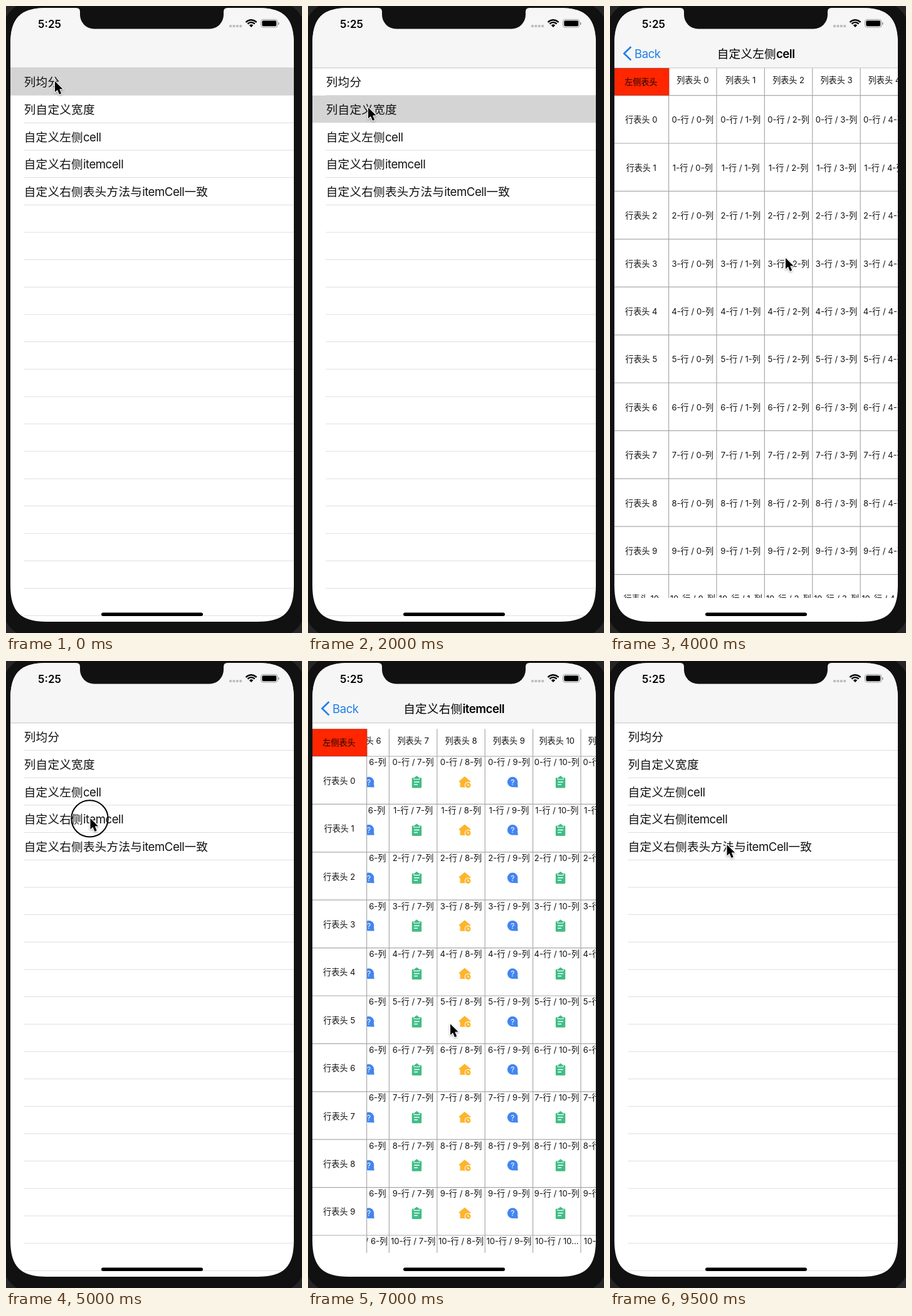
Animation of 472x1000 px, one loop 10000 ms. Source, as an HTML page with a canvas:

```html
<!DOCTYPE html>
<html lang="zh">
<head>
<meta charset="utf-8">
<title>Table demo</title>
<style>
html, body { margin: 0; width: 100%; height: 100%; overflow: hidden; background: #111; }
canvas { display: block; width: 472px; height: 1000px; }
</style>
</head>
<body>
<canvas id="stage"></canvas>
<script>
const canvas = document.getElementById('stage');
const ctx = canvas.getContext('2d');
const ratio = window.devicePixelRatio || 1;
canvas.width = 472 * ratio;
canvas.height = 1000 * ratio;

const FONT = 'Inter, "Noto Sans CJK SC", "Noto Sans CJK", sans-serif';
const LEFT = 7, RIGHT = 459, TOP = 99, BOTTOM = 944;
const SCREEN_TOP = 3, SCREEN_BOTTOM = 982;
const SIDE = 93.6, HEAD = 43.6, CELL = 76.4;
const INK = '#111', GRID = '#a9a9a9', WHITE = '#fff';
const STEP = 500;

const TITLES = ['列均分', '列自定义宽度', '自定义左侧cell', '自定义右侧itemcell', '自定义右侧表头方法与itemCell一致'];

const list = (cursor, opts) => ({ cursor, ...opts });
const table = (page, x, y, cursor, press) => ({ page, x, y, cursor, press });

const STATES = [
  list([78, 120], { lit: 0 }),
  table(0, 0, 0, [300, 332], true),
  table(0, 1050.6, 0, [100.5, 135]),
  list([64, 114]),
  list([96, 162], { lit: 1 }),
  table(1, 0, 0, [330, 412]),
  table(1, 0, 84, [373.3, 343], true),
  list([92, 207], { lit: 2 }),
  table(2, 0, 0, [280, 402]),
  table(2, 0, 0, [60, 82]),
  list([134.5, 251], { press: true }),
  table(3, 0, 0, [260, 422]),
  table(3, 0, 120, [280, 402], true),
  table(3, 250, 0, [250, 482], true),
  table(3, 499, -9.4, [227, 579]),
  table(3, 499, 0, [120, 242]),
  list([64, 92]),
  list([185.5, 293], { lit: 4 }),
  table(4, 0, 0, [185.5, 293]),
  list([186.5, 293])
];

function box(x, y, w, h, color, r = 0) {
  ctx.fillStyle = color;
  ctx.beginPath();
  ctx.roundRect(x, y, w, h, r);
  ctx.fill();
}

function disc(x, y, r, color) {
  ctx.fillStyle = color;
  ctx.beginPath();
  ctx.arc(x, y, r, 0, Math.PI * 2);
  ctx.fill();
}

function path(points, color, width) {
  ctx.beginPath();
  points.forEach(p => ctx.lineTo(p[0], p[1]));
  ctx.strokeStyle = color;
  ctx.lineWidth = width;
  ctx.stroke();
}

function polygon(points, color) {
  ctx.beginPath();
  points.forEach(p => ctx.lineTo(p[0], p[1]));
  ctx.closePath();
  ctx.fillStyle = color;
  ctx.fill();
}

function clipped(x, y, w, h, draw) {
  ctx.save();
  ctx.beginPath();
  ctx.rect(x, y, w, h);
  ctx.clip();
  draw();
  ctx.restore();
}

// Screen outline with smooth corners: each starts `a` from the corner, with handles at `c`.
function screenPath() {
  const a = 58, c = 16;
  const [l, t, r, b] = [LEFT, SCREEN_TOP, RIGHT, SCREEN_BOTTOM];
  ctx.beginPath();
  ctx.moveTo(l + a, t);
  ctx.lineTo(r - a, t);
  ctx.bezierCurveTo(r - c, t, r, t + c, r, t + a);
  ctx.lineTo(r, b - a);
  ctx.bezierCurveTo(r, b - c, r - c, b, r - a, b);
  ctx.lineTo(l + a, b);
  ctx.bezierCurveTo(l + c, b, l, b - c, l, b - a);
  ctx.lineTo(l, t + a);
  ctx.bezierCurveTo(l, t + c, l + c, t, l + a, t);
}

// Latin and CJK runs get their own weight and tracking; y is the vertical middle.
function text(str, x, y, size, { color = INK, bold = false, align = 'center' } = {}) {
  ctx.fillStyle = color;
  ctx.textBaseline = 'alphabetic';
  ctx.textAlign = 'left';
  const large = size > 18;
  const setStyle = run => {
    const cjk = run.charCodeAt(0) > 0x2fff;
    const weight = bold ? (cjk ? 500 : 600) : 400;
    ctx.font = `${weight} ${size}px ${FONT}`;
    ctx.letterSpacing = (large ? (cjk ? 0.25 : size * -0.025) : 0) + 'px';
  };
  const runs = (str.match(/[\u3000-\u9fff]+|[^\u3000-\u9fff]+/g) || []).map(run => {
    setStyle(run);
    return { run, width: ctx.measureText(run).width };
  });
  if (align === 'center') x -= runs.reduce((sum, r) => sum + r.width, 0) / 2;
  for (const { run, width } of runs) {
    setStyle(run);
    ctx.fillText(run, x, y + size * 0.37);
    x += width;
  }
  ctx.letterSpacing = '0px';
}

function statusBar() {
  text('5:25', 69.5, 28.3, 17, { bold: true, color: '#000' });
  for (let i = 0; i < 4; i++) box(356 + i * 5.4, 30, 4, 4, '#bdbdbd', 1.5);

  ctx.strokeStyle = '#000';
  ctx.lineWidth = 2.4;
  for (const r of [11.3, 7.4]) {
    ctx.beginPath();
    ctx.arc(391, 33.5, r, -Math.PI * 0.77, -Math.PI * 0.23);
    ctx.stroke();
  }
  ctx.fillStyle = '#000';
  ctx.beginPath();
  ctx.moveTo(391, 34);
  ctx.arc(391, 33.5, 4.2, -Math.PI * 0.77, -Math.PI * 0.23);
  ctx.fill();

  ctx.strokeStyle = '#999';
  ctx.lineWidth = 1;
  ctx.beginPath();
  ctx.roundRect(406.5, 21.5, 26.5, 12.5, 3.5);
  ctx.stroke();
  box(408.3, 23.3, 22.9, 8.9, '#000', 2);
  box(434, 26, 1.6, 4, '#999', 1);
}

function notch() {
  ctx.fillStyle = '#111';
  ctx.beginPath();
  ctx.moveTo(112, 2);
  ctx.lineTo(112, 3);
  ctx.quadraticCurveTo(118, 3, 118, 9);
  ctx.lineTo(118, 14);
  ctx.arcTo(118, 36.5, 141, 36.5, 22.5);
  ctx.lineTo(324, 36.5);
  ctx.arcTo(347, 36.5, 347, 14, 22.5);
  ctx.lineTo(347, 9);
  ctx.quadraticCurveTo(347, 3, 353, 3);
  ctx.lineTo(353, 2);
  ctx.fill();
}

function navBar(title) {
  box(LEFT, SCREEN_TOP, RIGHT - LEFT, TOP - SCREEN_TOP, '#f6f6f6');
  box(LEFT, TOP - 0.7, RIGHT - LEFT, 1, '#c4c4c4');
  if (!title) return;
  const blue = '#1f7fe8';
  path([[33.5, 65], [22.5, 75.7], [33.5, 86.4]], blue, 2.7);
  text('Back', 39, 75.8, 18.6, { color: blue, align: 'left' });
  text(title, 232.7, 75.8, 18.6, { bold: true, color: '#000' });
}

function listScreen({ lit }) {
  const row = 43.67;
  navBar();
  for (let i = 0; i < 20; i++) {
    const y = TOP + i * row;
    if (i === lit) box(LEFT, y, RIGHT - LEFT, row, '#d4d4d4');
    else box(28.5, y + row - 0.6, RIGHT - 28.5, 1, '#dedede');
    if (TITLES[i]) text(TITLES[i], 28.7, y + 22.6, 18.6, { align: 'left' });
  }
}

function helpIcon(x, y) {
  disc(x, y, 8.3, '#4285f0');
  polygon([[x + 1, y + 8.2], [x + 8.6, y + 8.4], [x + 8, y + 2]], '#4285f0');
  text('?', x, y + 0.3, 12, { color: WHITE });
}

function clipboardIcon(x, y) {
  const green = '#3fbd86';
  box(x - 7.7, y - 7, 15.4, 16.5, green, 1.5);
  polygon([[x - 5, y - 6], [x, y - 10], [x + 5, y - 6]], green);
  path([[x - 5, y - 6.4], [x - 4, y - 4.2], [x + 4, y - 4.2], [x + 5, y - 6.4]], WHITE, 1.1);
  path([[x - 4.3, y], [x + 4.3, y]], WHITE, 1.5);
  path([[x - 4.3, y + 4], [x + 1.5, y + 4]], WHITE, 1.5);
}

function houseIcon(x, y) {
  const orange = '#fdb52c';
  polygon([[x, y - 9], [x + 9.8, y - 0.8], [x + 7.5, y + 1], [x + 7.5, y + 8.5],
    [x - 7.2, y + 8.5], [x - 7.2, y + 1], [x - 9.6, y - 0.8]], orange);
  disc(x + 5.4, y + 5, 5.4, WHITE);
  disc(x + 5.4, y + 5, 4.3, orange);
  path([[x + 5.2, y + 2.6], [x + 5.2, y + 5.4], [x + 7.6, y + 5.4]], WHITE, 1.1);
}

const ICONS = [helpIcon, clipboardIcon, houseIcon];

function cell(row, col, x, y, width, icons) {
  const mid = x + width / 2;
  const label = `${row}-行 / ${col}-列`;
  const wide = row > 9 && col > 9 && width < 80;
  if (icons) {
    text(wide ? label.slice(0, -2) + '…' : label, mid, y + 9.6, 13.1);
    ICONS[col % 3](mid + 5.8, y + 41);
  } else if (wide) {
    text(label.slice(0, -1), mid, y + 31.5, 13.1);
    text('列', mid, y + 47, 13.1);
  } else {
    text(label, mid, y + 39, 13.1);
  }
}

function cornerCell(top) {
  box(LEFT, top, SIDE + 0.6 - LEFT, HEAD, '#ff2600');
  ctx.strokeStyle = '#c8301c';
  ctx.lineWidth = 1;
  ctx.strokeRect(LEFT + 0.5, top + 0.5, SIDE - LEFT - 0.4, HEAD - 1);
  text('左侧表头', 49.5, top + 22, 13.1, { color: '#200400' });
}

function tableScreen({ page, x, y }) {
  const headTop = TOP + Math.max(0, -y);
  const bodyTop = headTop + HEAD;
  const firstRow = TOP + HEAD - y;
  const rows = [];
  for (let r = 0; r < 20; r++) {
    const top = firstRow + r * CELL;
    if (top < BOTTOM && top + CELL > bodyTop) rows.push({ r, top });
  }
  navBar(TITLES[page]);

  clipped(SIDE, TOP, RIGHT - SIDE, BOTTOM - TOP, () => {
    let left = SIDE - x;
    for (let c = 0; c < 20; c++) {
      const width = page === 1 && c % 2 === 0 ? CELL * 2 : CELL;
      if (left < RIGHT && left + width > SIDE) {
        text('列表头 ' + c, left + width / 2, headTop + 18.7, 13.1);
        clipped(left, bodyTop, width, BOTTOM - bodyTop, () => {
          for (const { r, top } of rows) cell(r, c, left, top, width, page === 3);
        });
        box(left + width - 0.6, headTop, 1.2, BOTTOM - headTop, GRID);
      }
      left += width;
    }
  });

  clipped(LEFT, bodyTop, RIGHT - LEFT, BOTTOM - bodyTop, () => {
    for (const { r, top } of rows) {
      text('行表头 ' + r, 49.8, top + 39, 13.1);
      box(LEFT, top + CELL - 0.6, RIGHT - LEFT, 1.2, GRID);
    }
  });
  box(SIDE - 0.6, headTop, 1.2, BOTTOM - headTop, GRID);
  box(LEFT, bodyTop - 0.6, RIGHT - LEFT, 1.2, GRID);
  cornerCell(headTop);
}

function pointer([x, y], press) {
  if (press) {
    ctx.strokeStyle = '#000';
    ctx.lineWidth = 2;
    ctx.beginPath();
    ctx.arc(x - 1, y + 0.4, 29.2, 0, Math.PI * 2);
    ctx.stroke();
  }
  const shape = [[0, 0], [0, 17.5], [4, 13.8], [7, 21], [10.2, 19.6], [7.2, 12.6], [12.6, 12.4]];
  const arrow = shape.map(([dx, dy]) => [x + dx, y + dy]);
  ctx.save();
  ctx.lineJoin = 'round';
  ctx.shadowColor = 'rgba(0,0,0,.35)';
  ctx.shadowBlur = 3 * ratio;
  ctx.shadowOffsetY = ratio;
  path([...arrow, arrow[0], arrow[1]], WHITE, 2.4);
  ctx.restore();
  polygon(arrow, '#000');
}

function render(time) {
  const state = STATES[Math.floor(time / STEP) % STATES.length];
  ctx.setTransform(ratio, 0, 0, ratio, 0, 0);
  box(0, 0, 472, 1000, '#262626');
  box(-6, -8, 484, 1016, '#111', 50);

  ctx.save();
  screenPath();
  ctx.clip();
  box(LEFT, SCREEN_TOP, RIGHT - LEFT, SCREEN_BOTTOM - SCREEN_TOP, WHITE);
  if (state.page === undefined) listScreen(state);
  else tableScreen(state);
  statusBar();
  box(152, 967.4, 162, 5.5, '#000', 2.75);
  ctx.restore();

  notch();
  pointer(state.cursor, state.press);
}

const start = performance.now();
function tick() {
  render(performance.now() - start);
  requestAnimationFrame(tick);
}
tick();
</script>
</body>
</html>
```
